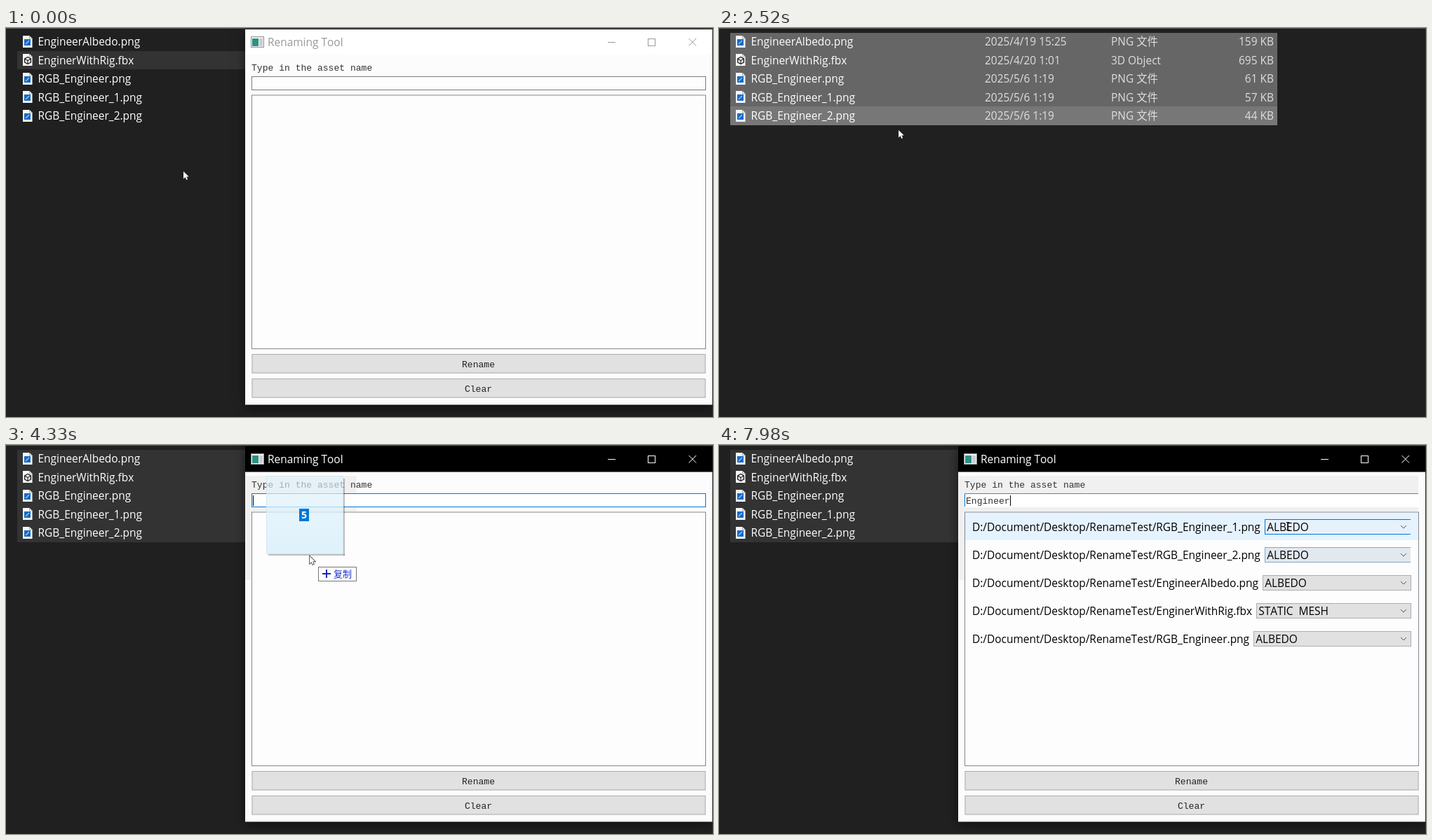
Write an HTML page with a canvas that moves like this. It is 1008x556 px and loops after 8 s.

```html
<!DOCTYPE html>
<html lang="en">
<head>
<meta charset="utf-8">
<title>Renaming Tool</title>
<style>
html, body { margin: 0; width: 100%; height: 100%; overflow: hidden; background: #202020; }
canvas { display: block; }
</style>
</head>
<body>
<canvas id="stage" width="1008" height="556"></canvas>
<script>
const ctx = document.getElementById('stage').getContext('2d');
const LOOP = 8000, PITCH = 26.4, BLUE = '#0078d7';
const SANS = '15.45px "Open Sans", "Noto Sans CJK SC", "Noto Sans CJK", sans-serif';
const MONO = '13.05px "Liberation Mono", monospace';
const TO_FRONT = 900, TO_BACK = 2610, DRAG = 3880, DROP = 4600, ENTER = 4690, LEAVE = 7440;
const TYPE = 5400, KEY = 160, BLINK = 530, WORD = 'Engineer';

const files = [
  ['EngineerAlbedo.png', '2025/4/19 15:25', 'PNG 文件', '159 KB'],
  ['EnginerWithRig.fbx', '2025/4/20 1:01', '3D Object', '695 KB'],
  ['RGB_Engineer.png', '2025/5/6 1:19', 'PNG 文件', '61 KB'],
  ['RGB_Engineer_1.png', '2025/5/6 1:19', 'PNG 文件', '57 KB'],
  ['RGB_Engineer_2.png', '2025/5/6 1:19', 'PNG 文件', '44 KB']
];
const dropOrder = [3, 4, 0, 1, 2];
// pointer stops: time, x, y
const stops = [
  [0, 253, 205], [720, 195, 130], [1080, 188, 155], [1260, 188, 155], [1800, 104, 18],
  [2520, 256, 146], [2970, 256, 146], [3240, 157, 95], [DRAG, 157, 95], [4330, 433, 159],
  [4780, 381, 79], [LEAVE, 381, 79], [7740, 805, 158], [7930, 811, 116]
];

function pointerAt(t) {
  t = Math.min(Math.max(t, 0), 7930);
  const i = Math.max(1, stops.findIndex(s => s[0] >= t));
  const [t0, x0, y0] = stops[i - 1], [t1, x1, y1] = stops[i];
  const u = (t - t0) / (t1 - t0), k = u * u * (3 - 2 * u);
  return { x: Math.round(x0 + (x1 - x0) * k), y: Math.round(y0 + (y1 - y0) * k) };
}

function rect(x, y, w, h, fill, edge) {
  ctx.fillStyle = fill;
  ctx.fillRect(x, y, w, h);
  if (edge) {
    ctx.strokeStyle = edge;
    ctx.lineWidth = 1;
    ctx.strokeRect(x + .5, y + .5, w - 1, h - 1);
  }
}

function text(s, x, y, color, font = SANS, align = 'left') {
  ctx.font = font;
  ctx.fontKerning = 'none';
  ctx.fillStyle = color;
  ctx.textAlign = align;
  ctx.fillText(s, x, y);
  return ctx.measureText(s).width;
}

function trace(points, close) {
  ctx.beginPath();
  points.forEach(([x, y]) => ctx.lineTo(x, y));
  if (close) ctx.closePath();
}

function line(points, color, width = 1, close = false) {
  trace(points, close);
  ctx.strokeStyle = color;
  ctx.lineWidth = width;
  ctx.stroke();
}

function fileIcon(y, mesh) {
  ctx.save();
  ctx.translate(24, y);
  trace([[0, 0], [9.5, 0], [13.5, 4], [13.5, 17], [0, 17]], true);
  ctx.fillStyle = '#f8f8f8';
  ctx.fill();
  line([[9.5, 0], [9.5, 4], [13.5, 4]], '#a8a8a8');
  if (mesh) {
    const corner = i => [7 + 5 * Math.sin(i * Math.PI / 3), 9.5 + 5 * Math.cos(i * Math.PI / 3)];
    line([0, 1, 2, 3, 4, 5].map(corner), '#222', 1.4, true);
    [0, 2, 4].forEach(i => line([[7, 9.5], corner(i)], '#222', 1.2));
  } else {
    rect(2, 5, 9, 9, '#1769c4');
    line([[4, 12], [9, 7]], '#8fd0ff', 1.3);
  }
  ctx.restore();
}

const fileRow = p => p.x > 16 && p.x < 796 ? Math.floor((p.y - 6.5) / PITCH) : -1;

function drawFiles(t, p, before) {
  const front = t >= TO_FRONT && t < TO_BACK;
  const hover = fileRow(p), last = fileRow(before);
  files.forEach(([name, date, kind, size], i) => {
    const top = Math.round(6.5 + i * PITCH), end = Math.round(6.5 + (i + 1) * PITCH);
    const picked = t >= 1800 || (t > 1260 && p.y < end);
    let fill;
    if (picked && front) fill = i === hover || i === last ? '#777' : '#666';
    else if (picked) fill = i === hover && t < DRAG ? '#4d4d4d' : '#333';
    else if (i === 1) fill = '#333';
    else if (i === hover) fill = '#2d2d2d';
    if (fill) rect(16, top, 780, end - top, fill);
    const y = 25.4 + i * PITCH;
    fileIcon(Math.round(y - 14.4), i === 1);
    text(name, 45.5, y, '#fff');
    text(date, 379, y, '#dedede');
    text(kind, 559, y, '#dedede');
    text(size, 791, y, '#dedede', SANS, 'right');
  });
}

function drawTitle(active) {
  const ink = active ? '#fff' : '#999';
  rect(341, 2, 666, 36.5, active ? '#000' : '#fff');
  rect(349, 12, 19, 16, '#f2f2f2', '#8a9299');
  rect(351, 15, 9, 11, '#2f8f83');
  rect(361, 15, 5, 11, '#c9ced2');
  text('Renaming Tool', 373, 25.8, ink);
  line([[858, 20.5], [869, 20.5]], ink);
  ctx.strokeRect(915.5, 15.5, 10, 10);
  line([[973.5, 15], [984, 25.5]], ink);
  line([[984, 15], [973.5, 25.5]], ink);
}

function drawInput(t, active) {
  const left = t >= LEAVE;
  if (left) {
    rect(350, 69, 648, 20, '#fff');
    rect(350, 69, 647, 1, '#7a7a7a');
    rect(350, 70, 1, 18, BLUE);
  } else {
    rect(350, 69, 648, 20, active ? '#fff' : '#fdfdfd', !active ? '#7a7a7a' : t >= ENTER ? '#222' : BLUE);
  }
  const count = Math.min(WORD.length, Math.max(0, Math.floor((t - TYPE) / KEY) + 1));
  const width = text(WORD.slice(0, count), 352, 84, '#333', MONO);
  // the caret restarts its blink after each event
  const since = count ? TYPE + (count - 1) * KEY : t >= DROP ? DROP : t >= DRAG ? DRAG : TO_BACK;
  if (active && (t - since) % (2 * BLINK) < BLINK) rect(Math.round(352 + width), 72, 1, 15, '#000');
}

const assetRow = p => p.x > 351 ? Math.floor((p.y - 97) / 40) : -1;

function drawAssets(t, p, before) {
  const hover = t > LEAVE ? assetRow(p) : -1;
  const last = t > LEAVE ? assetRow(before) : -1;
  dropOrder.forEach((file, i) => {
    const y = 106 + i * 40, hot = i === hover;
    if (hot) rect(351, y - 9, 646, 39, '#e5f3ff');
    const width = text('D:/Document/Desktop/RenameTest/' + files[file][0], 361, y + 16.8, '#000');
    const x = Math.round(367 + width), inside = hot && p.x > x;
    const fading = !inside && i === last && before.x > x;
    rect(x, y, 987 - x, 22, inside ? '#e5f1fb' : fading ? '#e1e8ee' : '#e1e1e1',
      inside ? BLUE : fading ? '#7fa9cc' : '#adadad');
    if (inside || fading) rect(986, y, 1, 22, hot ? '#e5f3ff' : '#fdfdfd');
    text(file === 1 ? 'STATIC  MESH' : 'ALBEDO', x + 3.2, y + 16.8, '#000');
    line([[972, y + 9], [976, y + 13], [980, y + 9]], '#555');
  });
}

function drawWindow(t, p, before) {
  const active = t >= TO_BACK, pale = !active || t >= DRAG;
  ctx.save();
  ctx.shadowColor = 'rgba(0,0,0,.55)';
  ctx.shadowBlur = 14;
  ctx.shadowOffsetY = 3;
  rect(341, 2, 666, 536.5, pale ? '#fcfcfc' : '#f0f0f0');
  ctx.restore();
  if (t >= DRAG) {
    rect(341, 44, t < DROP ? 159 : 656, 51, '#f0f0f0');
    rect(341, 44, 9, 149, '#f0f0f0');
  }
  drawTitle(active);
  text('Type in the asset name', 350, 60.5, '#333', MONO);
  drawInput(t, active);
  rect(350, 95.5, 648, 363.5, pale ? '#fdfdfd' : '#fff', '#828790');
  if (t >= DROP) drawAssets(t, p, before);
  ['Rename', 'Clear'].forEach((label, i) => {
    const y = 466 + i * 35;
    rect(350.5, y, 647, 27.5, '#e1e1e1', '#adadad');
    text(label, 673.5, y + 19, '#222', MONO, 'center');
  });
}

function drawDrag({ x, y }) {
  const gx = x - 62, gy = y - 115;
  const fill = ctx.createLinearGradient(0, gy, 0, gy + 112);
  fill.addColorStop(0, 'rgba(225,242,250,.62)');
  fill.addColorStop(1, 'rgba(220,241,252,.94)');
  rect(gx + 110, gy + 4, 2, 110, 'rgba(0,0,0,.25)');
  rect(gx + 3, gy + 112, 109, 2, 'rgba(0,0,0,.25)');
  rect(gx, gy, 110, 112, fill, 'rgba(205,228,238,.7)');
  rect(x - 15, y - 68, 14, 18, BLUE);
  text('5', x - 8, y - 54, '#fff', 'bold 14px "Open Sans", sans-serif', 'center');
  if (x < 341) return;
  rect(x + 12, y + 15, 55, 21, '#fff', '#767676');
  rect(x + 18, y + 24, 12, 2, '#1428b4');
  rect(x + 23, y + 19, 2, 12, '#1428b4');
  text('复制', x + 34, y + 30, '#1a32d0', '13px "Noto Sans CJK SC", "Noto Sans CJK", sans-serif');
}

function drawPointer({ x, y }, beam) {
  ctx.save();
  ctx.translate(x, y);
  if (beam) {
    [-5.5, 5.5].forEach(end => line([[-2.5, end], [2.5, end]], '#222'));
    line([[-.5, -5], [-.5, 5]], '#222');
  } else {
    line([[0, 0], [0, 10.5], [2.6, 8.2], [4.2, 12], [6, 11.2], [4.4, 7.6], [7.7, 7.6]], '#222', 1.4, true);
    ctx.fillStyle = '#fff';
    ctx.fill();
  }
  ctx.restore();
}

function draw(t) {
  // the pointer is sampled in steps of 90 ms
  const shift = t >= 3610 ? 10 : 0;
  const step = Math.floor((t - shift) / 90) * 90 + shift;
  const p = pointerAt(step), before = pointerAt(step - 135);
  rect(0, 0, 1008, 556, '#202020');
  drawFiles(t, p, before);
  rect(0, 0, 1008, 1, '#5a5a5a');
  rect(1007, 0, 1, 556, '#333');
  if (t < TO_FRONT || t >= TO_BACK) drawWindow(t, p, before);
  if (t >= DRAG && t < DROP) drawDrag(p);
  drawPointer(p, t >= ENTER);
}

function tick() {
  draw(performance.now() % LOOP);
  requestAnimationFrame(tick);
}
tick();
</script>
</body>
</html>
```
